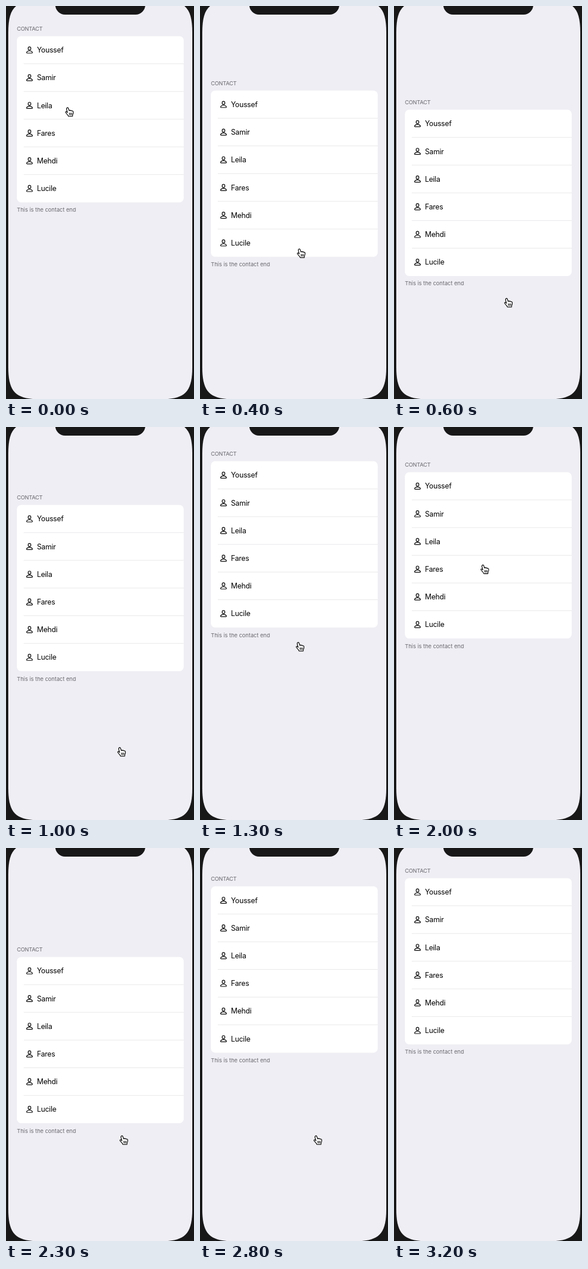
Write an HTML page that moves like this. It is 328 px wide and 684 px high and loops after 4.4 s.

```html
<!DOCTYPE html>
<html lang="en">
<head>
<meta charset="utf-8">
<title>Contact list</title>
<style>
  html, body { margin: 0; width: 100%; height: 100%; overflow: hidden; background: #181819; }
  svg { display: block; width: 328px; height: 684px; font-family: Inter, "Open Sans", sans-serif; }
  .small { font-size: 9.6px; fill: #69686e; }
  .name { font-size: 12.6px; letter-spacing: -.22px; }
  .icon { fill: none; stroke: #000; stroke-width: 1.2; }
  .line { stroke: #e8e8ea; }
</style>
</head>
<body>
<svg viewBox="0 0 328 684">
  <defs>
    <g id="person" class="icon">
      <ellipse cx="41" cy="73.9" rx="2.4" ry="2.8"/>
      <path d="M37 82h8c1.1 0 1.5-.8 1-1.5C45 78.8 43.3 78 41 78S37 78.8 36 80.5C35.5 81.2 35.9 82 37 82Z"/>
    </g>
  </defs>
  <path id="screen" fill="#efeef4"/>
  <g id="list">
    <text class="small" x="19" y="43" letter-spacing="-.25">CONTACT</text>
    <rect x="19" y="52.4" width="291" height="289.4" rx="7.5" fill="#fff"/>
    <g id="rows"></g>
    <text class="small" x="19" y="358.3">This is the contact end</text>
  </g>
  <rect x="86" y="-30" width="157" height="45" rx="17" fill="#181819"/>
  <g id="hand" stroke="#000" stroke-width="1.2" stroke-linejoin="round" stroke-linecap="round">
    <path fill="#fff" d="M3 1.6C4 .3 5.4.8 5.8 2L7.2 6.2C7.6 5.2 9.2 5 9.6 6.4C10 5.5 11.7 5.4 12 7C12.6 6.2 14.3 6.6 14.4 8.2C14.6 10 14 11.6 13.4 13L13 16L9.6 15.8L6 16C5.6 14.5 4 12.8 2.6 11.4C1.4 10.2.6 9 .9 8.3C1.4 7.5 2.9 7.8 3.8 9.2L4.2 9.4L2.7 4C2.4 3 2.6 2.2 3 1.6Z"/>
    <path fill="none" stroke-width="1" d="M7.5 10.2l.2 3.2M9.5 10.2v3.2M11.5 10.2v3.2"/>
  </g>
</svg>
<script>
const STEP = 100, LOOP = 4400, ROW = 48.2;
const get = id => document.getElementById(id);
const list = get('list'), hand = get('hand');

// Rounded rectangle with continuous-curvature corners
function squircle(l, t, r, b, e, c) {
  return `M${l} ${t + e}C${l} ${t + c} ${l + c} ${t} ${l + e} ${t}H${r - e}
    C${r - c} ${t} ${r} ${t + c} ${r} ${t + e}V${b - e}
    C${r} ${b - c} ${r - c} ${b} ${r - e} ${b}H${l + e}
    C${l + c} ${b} ${l} ${b - c} ${l} ${b - e}Z`;
}
get('screen').setAttribute('d', squircle(4, -10, 325, 684.5, 56, 12.7));

get('rows').innerHTML = ['Youssef', 'Samir', 'Leila', 'Fares', 'Mehdi', 'Lucile'].map((name, i) =>
  `<g transform="translate(0 ${i * ROW})">
    ${i ? '<path class="line" d="M31 52.4H310"/>' : ''}
    <use href="#person"/><text class="name" x="54" y="81.2">${name}</text>
  </g>`).join('');

// Pointer stops: step, x, y
const stops = [
  [0, 103, 176], [6, 192, 508], [8, 197, 581], [9, 197, 581],
  [10, 194, 557], [16, 140, 191], [19, 142, 191], [23, 198, 500]
];
const smooth = p => p * p * (3 - 2 * p);

function pointer(s) {
  const k = stops.findIndex(p => p[0] > s);
  if (k < 0) return stops.at(-1).slice(1);
  const [t0, x0, y0] = stops[k - 1], [t1, x1, y1] = stops[k];
  const f = smooth((s - t0) / (t1 - t0));
  return [x0 + (x1 - x0) * f, y0 + (y1 - y0) * f];
}

// Rubber-band resistance while dragging, critically damped return afterwards
const stretch = d => 700 * (1 - 1 / (Math.max(d, 0) * .55 / 700 + 1));
const settle = u => (1 + u) * Math.exp(-u);
const pulls = [
  { grab: 222.7, low: 581, free: 10, lead: 1.55 },
  { grab: 189.6, low: 500, free: 26, lead: 1.65 }
];

function offset(s, y) {
  const { grab, low, free, lead } = pulls[s < 18 ? 0 : 1];
  if (s < free) return stretch(y - grab);
  const d = stretch(low - grab) * settle(lead + 1.09 * (s - free));
  return d < .5 ? 0 : d;
}

const start = performance.now();
function draw() {
  const s = Math.floor((performance.now() - start) % LOOP / STEP);
  const [x, y] = pointer(s);
  list.setAttribute('transform', `translate(0 ${offset(s, y).toFixed(2)})`);
  hand.setAttribute('transform', `translate(${x} ${y})`);
  hand.style.display = s < 30 ? '' : 'none';
  requestAnimationFrame(draw);
}
draw();
</script>
</body>
</html>
```
